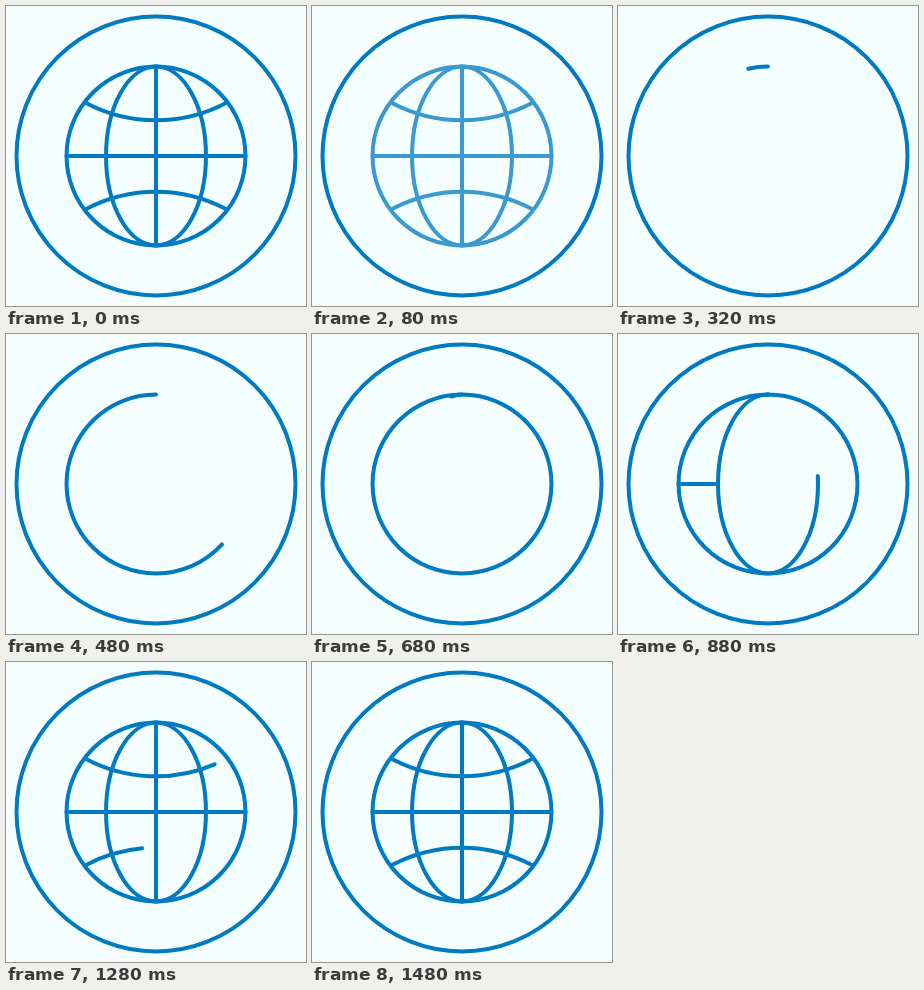
These frames come from a looping animation (300x300 px, 4.2 s). An HTML page:

```html
<!DOCTYPE html>
<html lang="en">
<head>
<meta charset="utf-8">
<title>Globe</title>
<style>
  html, body { margin: 0; height: 100%; overflow: hidden; background: #f5feff; }
  svg { display: block; width: 100%; height: 100%; fill: none; stroke: #007ac1; stroke-width: 4; stroke-linecap: round; }
</style>
</head>
<body>
<svg viewBox="0 0 300 300">
  <circle cx="150" cy="150" r="139.5"/>
  <g id="globe">
    <path data-start="272" d="M150 60.5A89.5 89.5 0 0 0 150 239.5A89.5 89.5 0 0 0 150 60.5"/>
    <path data-start="640" d="M150 60.5A50 89.5 0 0 0 150 239.5A50 89.5 0 0 0 150 60.5"/>
    <path data-start="768" d="M60.5 150H239.5"/>
    <path data-start="865" d="M150 60.5V239.5"/>
    <path data-start="994" d="M80 97A150 150 0 0 0 220 97"/>
    <path data-start="1120" d="M80 203A150 150 0 0 1 220 203"/>
  </g>
</svg>
<script>
const LOOP = 4200, STEP = 40, DRAW = 360;
const FADE_START = 50, FADE_END = 175, BLANK_END = 240;
const globe = document.getElementById('globe');
const paths = [...globe.children];
paths.forEach(p => p.setAttribute('pathLength', 1));

const clamp = x => Math.min(1, Math.max(0, x));

// Same curve as CSS ease-in-out: cubic-bezier(.42, 0, .58, 1)
function easeInOut(x) {
  let lo = 0, hi = 1;
  for (let i = 0; i < 24; i++) {
    const u = (lo + hi) / 2, v = 1 - u;
    if (3 * v * v * u * 0.42 + 3 * v * u * u * 0.58 + u * u * u < x) lo = u;
    else hi = u;
  }
  return lo * lo * (3 - 2 * lo);
}

function draw() {
  const now = performance.now() % LOOP;
  const t = Math.floor(now / STEP) * STEP;
  const fading = t < BLANK_END;
  globe.style.opacity = fading ? clamp((FADE_END - t) / (FADE_END - FADE_START)) : 1;
  for (const p of paths) {
    const x = fading ? 1 : clamp((t - p.dataset.start) / DRAW);
    p.style.visibility = x > 0 ? 'visible' : 'hidden';
    p.style.strokeDasharray = x < 1 ? `${easeInOut(x)} 2` : 'none';
  }
  requestAnimationFrame(draw);
}
draw();
</script>
</body>
</html>
```
